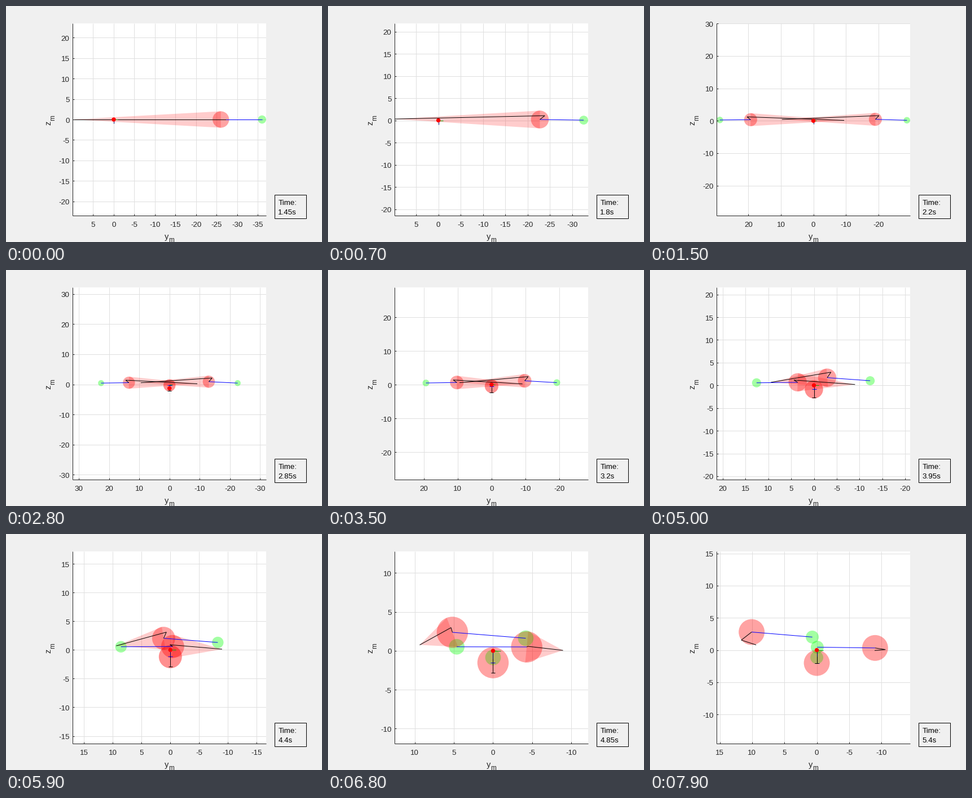
These frames come from a looping animation (560x420 px, 8 s). A matplotlib script:

```python
import numpy as np
import matplotlib.pyplot as plt
from matplotlib.animation import FuncAnimation
from matplotlib.patches import Circle, Polygon, Rectangle

W, H, DPI = 560, 420, 100
FRAMES, INTERVAL = 80, 100
LEFT, RIGHT, TOP, BOTTOM = 118, 461, 31, 373
CX, CY = (LEFT + RIGHT) / 2, (TOP + BOTTOM) / 2
INK, GRID, PAPER = "#262626", "#dfdfdf", "#f0f0f0"
PX = 72 / DPI
# steps at which bodies two and three appear, and the third one comes close
SECOND_AT, THIRD_AT, CLOSE_AT = 8, 21, 64

plt.rcParams["font.family"] = "Liberation Sans"
fig = plt.figure(figsize=(W / DPI, H / DPI), dpi=DPI, facecolor=PAPER)
ax = fig.add_axes([0, 0, 1, 1])
ax.set_xlim(0, W)
ax.set_ylim(H, 0)
ax.axis("off")


def label(x, y, text, px=13.33, color=INK, **kw):
    return ax.text(x, y, text, fontsize=px * PX, color=color, va="baseline", **kw)


def line(points, color, z):
    xs, ys = zip(*points)
    return ax.plot(xs, ys, color=color, lw=PX, zorder=z,
                   solid_capstyle="butt", solid_joinstyle="miter")[0]


plot_area = ax.add_patch(Rectangle((LEFT, TOP), RIGHT - LEFT, BOTTOM - TOP,
                                   fc="white", ec="none", zorder=0))
line([(LEFT, TOP), (LEFT, BOTTOM)], INK, 9)
line([(LEFT, BOTTOM), (RIGHT, BOTTOM)], INK, 9)
label(281, 415, "y", 14.67)
label(288.5, 420, "m", 11.7)
turned = dict(rotation=90, rotation_mode="anchor")
label(79.5, 211.5, "z", 14.67, **turned)
label(86.5, 203.5, "m", 11.7, **turned)
ax.add_patch(Rectangle((476, 336), 56, 42, fc=PAPER, ec="black", lw=PX))
label(482.3, 354, "Time:", color="black")
clock = label(482.3, 371, "", color="black")
live = []


def climb(s, end, power=1, hump=0):
    return end * s ** power + hump * np.sin(np.pi * s)


def crosser(k, side, reach, drag, tip, red, green, lift, drop, power):
    """Parts of a body that flies in from one side, as (y, z) points."""
    s = k / (FRAMES - 1)
    lead = reach + (10 - reach) * np.exp(-k / 22)
    y = 36 - .489 * k + drag * k ** 2
    up = lift * (1 - np.exp(-k / 6)) - drop * s ** power
    head = np.array([side * (y - lead), climb(s, *red)])
    return dict(tip=np.array([-side * lead, climb(s, *tip)]),
                red=head,
                bend=head + [side * (1.1 - 2.7 * s ** 5), up],
                green=np.array([side * y, climb(s, *green)]))


def head_on(k):
    """Parts of the body that flies along the line of sight."""
    s = k / (FRAMES - 1)
    red = climb(s, -2, 1.8)
    heights = dict(red=red, green=climb(s, -1.15, 2),
                   foot=red - 1.9 * (1 - s ** 8))
    return {name: np.array([0, z]) for name, z in heights.items()}


def dot_height(k):
    phase = np.clip((k - THIRD_AT) / 28, 0, 1)
    return -1.3 * np.sin(2 * np.pi * phase)


def keep(artist, clip=True):
    if clip:
        artist.set_clip_path(plot_area)
    live.append(artist)


def ball(center, radius, color, alpha, z):
    keep(ax.add_patch(Circle(center, radius, fc=color, ec="none",
                             alpha=alpha, zorder=z)))


def red_ball(center, radius):
    for z in (3, 5):
        ball(center, radius, "red", .2, z)


def view(bodies, k):
    """Return the limits' centre and the common span of both axes."""
    pts = []
    for b in bodies:
        pts += [b["red"] + 2, b["red"] - 2, b["green"] + 1, b["green"] - 1]
        pts += [b[n] for n in ("tip", "bend") if n in b]
    lo, hi = np.min(pts, axis=0), np.max(pts, axis=0)
    span = max(hi - lo)
    if k >= THIRD_AT:
        depth = max(22.6, 24.75 + .982 * (68 - k), 29.9 + .982 * (k - 79))
        span = max(span, depth)
    return (lo + hi) / 2, span


def draw_ticks(mid, span, to_px):
    for axis, dense_below in enumerate((50, 55)):
        step = 5 if span < dense_below else 10
        first = np.ceil((mid[axis] - span / 2) / step) * step
        for v in np.arange(first, mid[axis] + span / 2, step):
            x, y = to_px((v, v))
            if axis == 0:
                keep(line([(x, TOP), (x, BOTTOM)], GRID, 1))
                keep(line([(x, BOTTOM), (x, BOTTOM - 3)], INK, 9))
                keep(label(x, 393, f"{v:.0f}", ha="center"), False)
            else:
                keep(line([(LEFT, y), (RIGHT, y)], GRID, 1))
                keep(line([(LEFT, y), (LEFT + 3, y)], INK, 9))
                keep(label(112.5, y + 5.5, f"{v:.0f}", ha="right"), False)


def draw_crosser(b, scale, to_px):
    tip, red, green = b["tip"], b["red"], b["green"]
    if red[0] / tip[0] < 1:
        d = red - tip
        side = 2 * np.array([-d[1], d[0]]) / np.hypot(*d)
        cone = [to_px(p) for p in (tip, red + side, red - side)]
        keep(ax.add_patch(Polygon(cone, fc="red", ec="none", alpha=.2, zorder=2)))
    red_ball(to_px(red), 2 * scale)
    ball(to_px(green), scale, "lime", .36, 4)
    keep(line([to_px(red), to_px(green)], "blue", 6))
    keep(line([to_px(p) for p in (tip, b["bend"], red)], "black", 6))


def draw_head_on(b, k, scale, to_px):
    x, y = to_px(b["red"])
    foot = to_px(b["foot"])
    red_ball((x, y), 2 * scale)
    if k < CLOSE_AT:
        ball((x, y), 2 * scale, "red", .12, 2)
    else:
        ball(to_px(b["green"]), scale, "lime", .36, 4)
    keep(line([(x - 4, y), (x + 4, y)], "blue", 6))
    keep(line([to_px((0, dot_height(k))), foot], "black", 6))
    keep(line([(x - 3.5, foot[1]), (x + 3.5, foot[1])], "black", 6))


def update(k):
    while live:
        live.pop().remove()
    crossers = [crosser(k, -1, 9.35, .00031, tip=(.8, .4), red=(2.8, 1.1),
                        green=(2.02, 1.5), lift=1.25, drop=2.5, power=9)]
    if k >= SECOND_AT:
        crossers.append(crosser(k, 1, 8.9, .00041, tip=(-.06, 1, .25),
                                red=(.33, 1, .5), green=(.45, 1, .3),
                                lift=1, drop=1.25, power=2))
    third = [head_on(k)] if k >= THIRD_AT else []
    mid, span = view(crossers + third, k)
    scale = (RIGHT - LEFT) / span

    def to_px(p):
        return CX - (p[0] - mid[0]) * scale, CY - (p[1] - mid[1]) * scale

    draw_ticks(mid, span, to_px)
    for b in crossers:
        draw_crosser(b, scale, to_px)
    for b in third:
        draw_head_on(b, k, scale, to_px)

    # small frame at the origin: forward, right, down
    keep(line([to_px((0, 0)), to_px((0, -1))], "#000060", 6))
    keep(line([to_px((0, 0)), to_px((-1, 0))], "#00a000", 6))
    ball(to_px((0, dot_height(k))), 3.7, "red", 1, 7)
    clock.set_text(f"{1.45 + .05 * k:.4g}s")
    return live


anim = FuncAnimation(fig, update, frames=FRAMES, init_func=lambda: [],
                     interval=INTERVAL, repeat=True, repeat_delay=0, blit=False)
plt.show()
```
